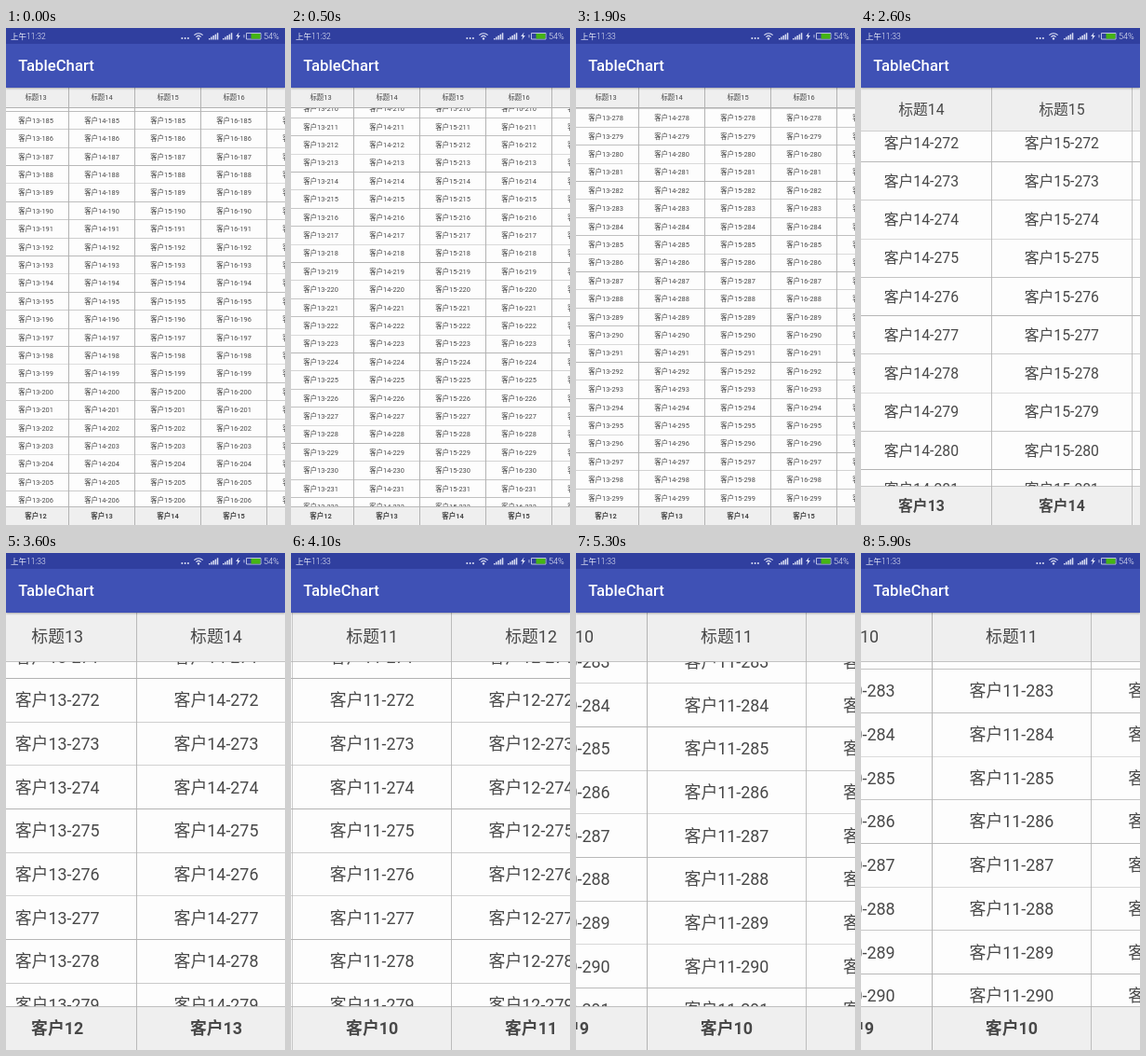
An HTML page with a canvas that plays this animation: 300x533 px, repeating every 6 s.

```html
<!DOCTYPE html>
<html lang="zh-CN">
<head>
<meta charset="utf-8">
<title>TableChart</title>
<style>
  html, body { margin: 0; width: 100%; height: 100%; overflow: hidden; background: #fdfdfd; }
  body { position: relative; font-family: Roboto, "Noto Sans CJK SC", sans-serif; color: #fff; }
  canvas { position: absolute; left: 0; top: 0; }
  .bar { position: absolute; left: 0; top: 0; width: 300px; height: 63.5px;
    background: linear-gradient(#303f9f 17px, #3f51b5 17px); box-shadow: 0 1px 2px rgba(0, 0, 0, .3); }
  svg { display: block; width: 300px; height: 64px; }
  .small { font-weight: 300; fill: #eef0fa; }
</style>
</head>
<body>
<canvas id="table" width="300" height="533"></canvas>
<div class="bar">
  <svg viewBox="0 0 300 64">
    <text id="clock" class="small" x="5" y="12" font-size="8.5">上午11:32</text>
    <g fill="#dde1f5">
      <circle cx="189.3" cy="11" r="1"/><circle cx="192.6" cy="11" r="1"/><circle cx="195.9" cy="11" r="1"/>
      <circle cx="207" cy="11.4" r="1.2"/>
      <g id="signal">
        <path d="M218 12.5v-1.6h1.5v1.6zM220.2 12.5v-3h1.5v3zM222.4 12.5v-4.4h1.5v4.4zM224.6 12.5v-5.8h1.5v5.8zM226.8 12.5v-7.2h1.5v7.2z"/>
      </g>
      <use href="#signal" x="15"/>
      <path d="M250.6 4.5l-3.4 4.6h2l-1 4 3.6-5h-2.1z"/>
    </g>
    <g fill="none" stroke="#dde1f5">
      <path d="M202.4 7.6a6.6 6.6 0 0 1 9.2 0M204.4 9.6a3.8 3.8 0 0 1 5.2 0" stroke-width="1.2"/>
      <path d="M258.5 5.5h15.5v6.5h-15.5zM256 7.2v3.2" stroke-width=".8"/>
    </g>
    <rect x="263.5" y="6" width="10" height="5.6" fill="#45b512"/>
    <text class="small" x="277" y="12" font-size="9">54%</text>
    <text x="13.3" y="46" font-size="16.7" font-weight="500" fill="#fff">TableChart</text>
  </svg>
</div>
<script>
const ctx = document.getElementById('table').getContext('2d');
const clock = document.getElementById('clock');
const W = 300, H = 533, TOP = 63.6;
const COL = 71, ROW = 19.4, HEAD = 21.9, FONT = 7.43, ROWS = 300;
const LOOP = 6000, STEP = 100;

// time, zoom, first visible column, first visible row
const keys = [
  [0, 1, 13.049, 184.8],
  [1000, 1, 13.049, 236.09],
  [1800, 1, 13.049, 277.93],
  [2100, 1, 13.049, 277.93],
  [2600, 2.126, 14.07, 272.19],
  [2900, 2.406, 14.18, 271.61],
  [3100, 2.406, 14.18, 271.61],
  [3600, 2.406, 13.177, 271.61],
  [4200, 2.406, 10.552, 271.61],
  [4700, 2.406, 10.552, 284.17],
  [5900, 2.406, 10.552, 282.82],
  [6000, 2.406, 10.552, 282.82]
];

// Scroll is blended in pixels so that zooming keeps its anchor point.
function view(t) {
  const i = keys.findIndex(k => k[0] > t);
  const [a, b] = [keys[i - 1], keys[i]];
  const u = (t - a[0]) / (b[0] - a[0]);
  const mix = (p, q) => p + (q - p) * u;
  return {
    zoom: mix(a[1], b[1]),
    x: mix(a[2] * a[1], b[2] * b[1]) * COL,
    y: mix(a[3] * a[1], b[3] * b[1]) * ROW
  };
}

function box(y, h, color) {
  ctx.fillStyle = color;
  ctx.fillRect(0, y, W, h);
}

// Hairlines fade with their distance from the pixel centre.
function line(pos, vertical, from, to) {
  const p = Math.floor(pos);
  ctx.globalAlpha = 1 - 1.2 * Math.abs(pos - p - .5);
  ctx.fillStyle = '#b2b2b2';
  if (vertical) ctx.fillRect(p, from, 1, to - from);
  else ctx.fillRect(from, p, to - from, 1);
  ctx.globalAlpha = 1;
}

function label(str, x, y, size) {
  ctx.fillStyle = '#484848';
  ctx.fillText(str, x, y + size * .36);
}

function draw(t) {
  const { zoom, x, y } = view(t);
  const cw = COL * zoom, rh = ROW * zoom, size = FONT * zoom;
  const headEnd = TOP + HEAD * zoom, foot = H - rh;
  const c0 = Math.floor(x / cw), r0 = Math.floor(y / rh);
  const font = weight => {
    ctx.font = `${weight} ${size}px Roboto, "Noto Sans CJK SC", sans-serif`;
  };
  const eachCol = fn => {
    for (let c = c0; c * cw - x < W; c++) fn(c, (c + .5) * cw - x);
  };

  box(0, H, '#fdfdfd');
  ctx.textAlign = 'center';
  font(400);
  for (let r = r0; r < ROWS; r++) {
    const top = headEnd + r * rh - y;
    if (top > foot) break;
    eachCol((c, cx) => label(`客户${c}-${r}`, cx, top + rh / 2, size));
    line(top + rh, false, 0, W);
  }

  box(TOP, headEnd - TOP, '#efefef');
  box(foot, rh, '#efefef');
  line(headEnd, false, 0, W);
  line(foot, false, 0, W);
  eachCol((c, cx) => {
    label(`标题${c}`, cx, (TOP + headEnd) / 2, size);
    line(cx + cw / 2, true, TOP, H);
  });
  font(700);
  eachCol((c, cx) => label(`客户${c - 1}`, cx, foot + rh / 2, size));

  clock.textContent = t < 1400 ? '上午11:32' : '上午11:33';
}

const start = performance.now();
let last = -1;
function tick() {
  const t = Math.floor(((performance.now() - start) % LOOP) / STEP) * STEP;
  if (t !== last) draw(last = t);
  requestAnimationFrame(tick);
}
tick();
</script>
</body>
</html>
```
